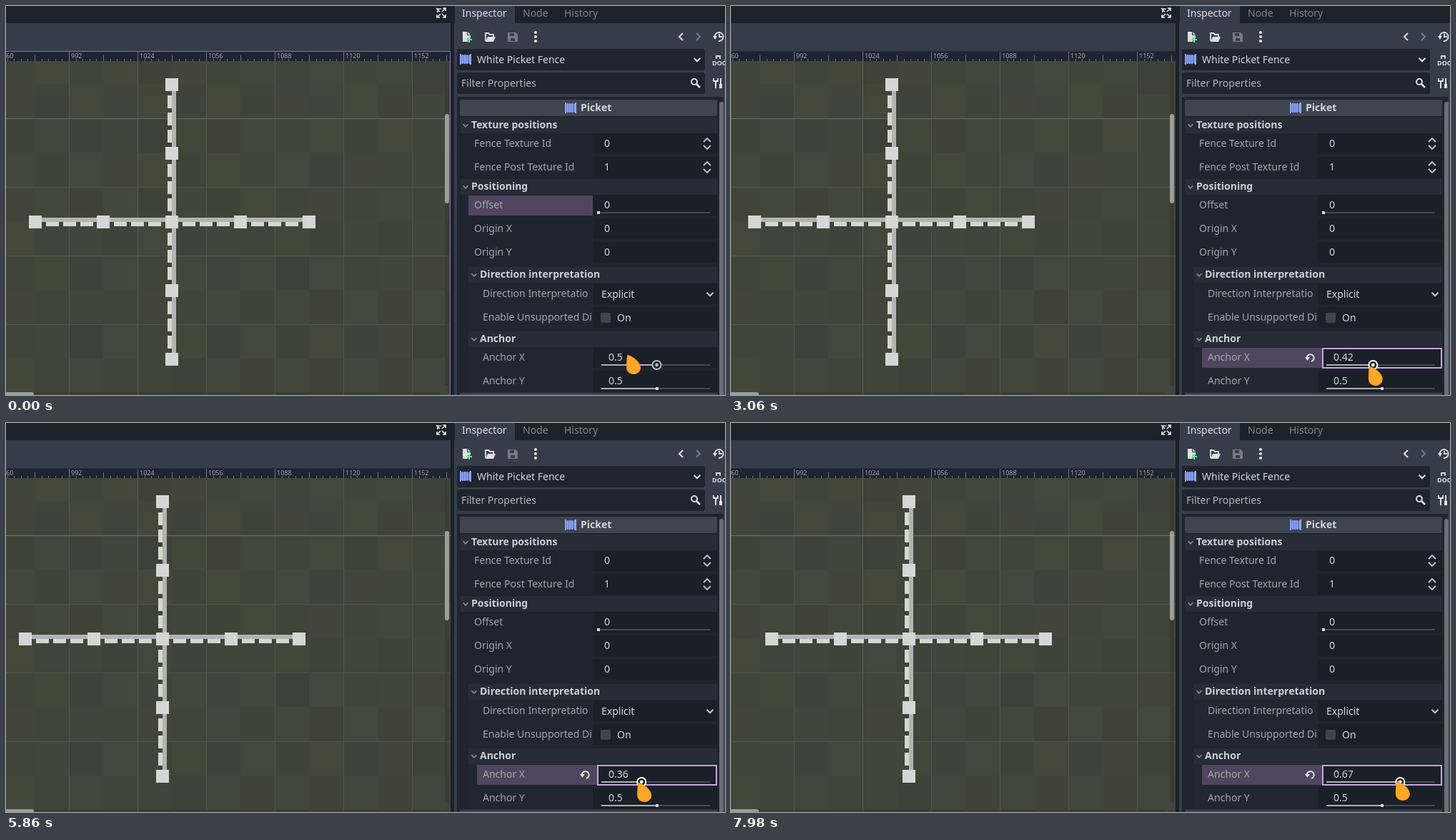
These frames come from a looping animation (1006x544 px, 8000 ms). An HTML page with a canvas:

```html
<!DOCTYPE html>
<html lang="en">
<head>
<meta charset="utf-8">
<title>Fence anchor slider</title>
<style>
html, body { margin: 0; width: 100%; height: 100%; overflow: hidden; background: #20242e; }
canvas { display: block; }
</style>
</head>
<body>
<canvas id="stage" width="1006" height="544"></canvas>
<script>
const ctx = document.getElementById('stage').getContext('2d');
const LOOP = 8000, SELECT = 1440, DRAG = 1660;
const DARK = '#1d212a', PANEL = '#363d4a', BOX = '#20242e', FIELD = '#1b1f28';
const LABEL = '#a3a6ad', BRIGHT = '#d3d5d9', ICON = '#e0e0e0', DIM = '#777b84', MARK = '#50455f';

// Keys: [time, value...]
const anchorKeys = [[1660, .5], [2220, .489], [2400, .487], [2500, .483], [3060, .42], [3240, .402],
  [3340, .39], [3940, .3], [4080, .285], [4340, .26], [4920, .26], [5400, .315], [5720, .354],
  [5860, .363], [6460, .5], [6700, .53], [7300, .618], [7980, .67]];
const cursorKeys = [[0, 868, 488], [400, 881, 501], [820, 899, 515], [1280, 904.5, 502], [1660, 904.5, 504]];
const cursorYKeys = [[1660, 504], [3060, 504], [3940, 503], [5860, 503], [6700, 501], [7980, 501]];

function sample(keys, t, col = 1) {
  const next = keys.findIndex(k => k[0] > t);
  if (next < 0) return keys[keys.length - 1][col];
  if (next === 0) return keys[0][col];
  const a = keys[next - 1], b = keys[next];
  return a[col] + (b[col] - a[col]) * (t - a[0]) / (b[0] - a[0]);
}

function rect(x, y, w, h, color) {
  ctx.fillStyle = color;
  ctx.fillRect(x, y, w, h);
}
function round(x, y, w, h, color, r = 3) {
  ctx.fillStyle = color;
  ctx.beginPath();
  ctx.roundRect(x, y, w, h, r);
  ctx.fill();
}
function dot(x, y, r, color) {
  ctx.fillStyle = color;
  ctx.beginPath();
  ctx.arc(x, y, r, 0, 7);
  ctx.fill();
}
function text(s, x, y, color = LABEL, font = '14px') {
  ctx.fillStyle = color;
  ctx.font = font + ' "Noto Sans", sans-serif';
  ctx.fillText(s, x, y);
}
function draw(path, color, width = 2) {
  ctx.strokeStyle = color;
  ctx.lineWidth = width;
  ctx.stroke(new Path2D(path));
}
function fill(path, color) {
  ctx.fillStyle = color;
  ctx.fill(new Path2D(path));
}

function viewport(focused) {
  rect(0, 0, 622, 24, DARK);
  rect(0, 24, 622, 39, PANEL);
  rect(0, 77, 622, 467, '#42453a');
  for (let i = 0; i < 14; i++) {
    for (let j = 0; j < 11; j++) {
      const noise = Math.abs(Math.sin(i * 12.9 + j * 78.2) * 43758.5) % 1;
      rect(i * 48 - 8, Math.max(77, 61 + j * 48), 48, 48,
        (i + j) % 2 ? `rgba(72,76,61,${noise * .45})` : `rgba(56,59,51,${noise * .35})`);
    }
  }
  for (let x = 88; x < 614; x += 96) rect(x, 77, 1, 467, x === 184 ? '#5b5e54' : '#525549');
  for (let y = 157; y < 540; y += 96) rect(0, y, 622, 1, y === 157 ? '#6c6e66' : '#525549');

  rect(0, 64, 622, 13, '#20242e');
  for (let i = -10; i < 56; i++) {
    const x = Math.round(88 + i * 9.6), h = i % 10 ? (i % 5 ? 3 : 8) : 13;
    rect(x, 77 - h, 1, h, '#747780');
  }
  for (let i = -1; i < 6; i++) text(992 + i * 32, 91 + i * 96, 73, '#a4a6ad', '9px');
  if (focused) {
    rect(0, 63, 622, 1, '#8d72a4');
    rect(621, 63, 1, 481, '#8d72a4');
  } else {
    rect(0, 63, 622, 1, '#252a34');
  }
  draw('M604 9V4h5M602 3l5 5M611 3h4v4M615 3l-5 5M603 12v4h4M603 16l5-5M615 12v4h-4M615 16l-5-5', ICON, 1.7);
}

function scrollbars() {
  round(614, 80, 6, 451, 'rgba(30,32,30,.2)');
  round(614, 151, 6, 125, '#9b9d98');
  round(0, 540, 607, 6, 'rgba(30,32,30,.2)');
  round(-4, 540, 43, 6, '#9b9d98');
}

function fence(center) {
  const posts = [-2, -1, 0, 1, 2];
  const xs = posts.map(k => Math.round(center + k * 95.8));
  const ys = posts.map(k => 302 + k * 96);
  const cx = xs[2];
  rect(xs[0], 296, xs[4] - xs[0], 6, '#b3b3b1');
  rect(cx, 110, 6, 384, '#b3b3b1');
  for (let i = 0; i < 4; i++) {
    for (let j = 0; j < 3; j++) {
      rect(xs[i] + 15 + j * 24, 302, 18, 6, '#d7d7d1');
      rect(cx - 6, ys[i] + 15 + j * 24, 6, 18, '#d7d7d1');
    }
  }
  xs.forEach(x => rect(x - 9, 293, 18, 18, '#d6d6d6'));
  ys.forEach(y => rect(cx - 9, y - 9, 18, 18, '#d6d6d6'));
}

function fenceIcon(x, y) {
  rect(x, y + 2, 16, 11, '#5f75bd');
  [0, 3, 6, 9, 13].forEach(dx => rect(x + dx, y + 1, 2, 13, '#8da5f3'));
  rect(x, y, 2, 15, '#8da5f3');
  rect(x + 14, y, 2, 15, '#8da5f3');
}
const chevron = (x, y, color = '#8b8e96', s = 3.5) =>
  draw(`M${x - s} ${y - s / 2}l${s} ${s}l${s} ${-s}`, color, s > 4 ? 2 : 1.6);

function toolbar() {
  rect(622, 0, 384, 544, DARK);
  rect(627, 24, 379, 520, PANEL);
  rect(628, 0, 84, 24, PANEL);
  text('Inspector', 638, 15, '#dddfe2');
  text('Node', 723, 15, '#7f838c');
  text('History', 781, 15, '#7f838c');

  fill('M639 36h6v5h5v4h-4v5h-7zM646 36l4 4h-4z', ICON);
  draw('M648 43v8M644 47h8', '#5fff97');
  draw('M671 49V38h4l2 2h5v3', ICON, 1.8);
  fill('M674 43h11l-3 7h-11z', ICON);
  fill('M702 37h11l3 3v10h-14z', DIM);
  rect(705, 38, 6, 4, PANEL);
  rect(706, 45, 6, 4, PANEL);
  [37, 43, 49].forEach(y => dot(741, y, 2.1, ICON));
  draw('M947 38l-5 5l5 5', ICON);
  draw('M966 38l5 5l-5 5', DIM);
  draw('M992 45A6 6 0 1 1 997 49M998 39v4h4', ICON, 1.8);
  fill('M989 42h6l-3 5z', ICON);

  round(631, 60, 347, 30, BOX);
  fenceIcon(635, 67);
  text('White Picket Fence', 659, 80, BRIGHT);
  chevron(967, 75, ICON, 4.5);
  round(631, 93, 347, 30, BOX);
  text('Filter Properties', 637, 113, '#b1b4ba');
  ctx.strokeStyle = ICON;
  ctx.lineWidth = 2;
  ctx.beginPath();
  ctx.arc(963, 106, 4, 0, 7);
  ctx.stroke();
  draw('M966 109l5 5', ICON, 2.5);
  draw('M994 74v-4h5v4', ICON, 1.8);
  text('DOC', 988, 83, ICON, 'bold 9px');
  draw('M993 104v11M1000 101v8', ICON);
  draw('M990 101v4h6v-4', ICON, 1.8);
  rect(998, 109, 4, 6, ICON);
}

function section(name, x, y) {
  rect(x - 16, y - 10, 995 - x + 16, 22, '#272c36');
  chevron(x - 8, y + 1);
  text(name, x, y + 5, '#cdd0d5', 'bold 14px');
}
function property(name, x, y, value, valueX) {
  rect(821, y - 14, 174, 29, FIELD);
  text(name, x, y + 5);
  text(value, valueX, y + 5, BRIGHT);
}
function slider(y, from, x, hot) {
  rect(from, y - 1, 985 - from, 2, '#484b53');
  rect(from, y - 1, x - from, 2, '#aeb0b5');
  if (!hot) return rect(x - 2, y - 2, 4, 4, '#d5d6d9');
  const color = hot === 2 ? '#ffffff' : '#b9bbc0';
  dot(x, y, 7, color);
  dot(x, y, 5, FIELD);
  dot(x, y, 2.4, color);
}

function inspector(t, anchor, knob, hoverY) {
  const selected = t >= SELECT, focused = t >= DRAG;
  rect(631, 127, 372, 417, BOX);
  round(998, 134, 6, 420, '#6b6f78');
  round(635, 131, 360, 23, '#40444f', 2);
  fenceIcon(782, 135);
  text('Picket', 804, 147, BRIGHT, 'bold 14px');

  section('Texture positions', 651, 166);
  property('Fence Texture Id', 655, 192, '0', 837);
  property('Fence Post Texture Id', 655, 225, '1', 837);
  [192, 225].forEach(y => draw(`M976 ${y - 2}l5 -5l5 5M976 ${y + 3}l5 5l5 -5`, '#c5c7cb', 1.8));

  section('Positioning', 651, 252);
  if (!selected) rect(647, 265, 174, 28, MARK);
  property('Offset', 655, 278, '0', 837);
  slider(289, 829, 829);
  property('Origin X', 655, 311, '0', 837);
  property('Origin Y', 655, 344, '0', 837);

  rect(647, 364, 174, 180, '#222630');
  section('Direction interpretation', 663, 375);
  property('Direction Interpretatio', 667, 402, '', 0);
  text('Explicit', 833, 408, BRIGHT);
  chevron(985, 403, '#c5c7cb', 4.5);
  property('Enable Unsupported Di', 667, 435, '', 0);
  round(832, 429, 14, 14, '#41444c', 2);
  text('On', 855, 441, BRIGHT);

  section('Anchor', 663, 465);
  if (selected) rect(659, 478, 168, 28, MARK);
  property('Anchor X', 667, 491, String(anchor), 843);
  if (selected) rect(821, 478, 7, 28, MARK);
  if (anchor !== .5) {
    draw('M806 494A5 5 0 1 1 812 497', ICON);
    fill('M803 491h7l-3.5 5z', ICON);
  }
  property('Anchor Y', 667, 524, '0.5', 843);
  if (focused) {
    rect(828, 479, 166, 27, FIELD);
    text(String(anchor), 843, 496, BRIGHT);
    ctx.strokeStyle = '#c9a2e3';
    ctx.lineWidth = 2;
    ctx.strokeRect(828, 479, 166, 27);
  }
  slider(502, 833, knob, selected ? 2 : hoverY ? 0 : 1);
  slider(535, 833, 911, hoverY ? 1 : 0);
  rect(635, 541, 360, 3, '#40444f');
}

function cursor(x, y) {
  ctx.save();
  ctx.translate(x, y);
  fill('M2.5 0C9 2 20 10 20 18A10 9.3 0 0 1 0 17.5C0 11 .5 6 1 1.5Q1.3 0 2.5 0Z', '#ffa726');
  draw('M2.5 .4C9 2.3 19.6 10 19.6 18A9.6 8.9 0 0 1 .4 17.5C.4 11 .9 6 1.3 1.6Z', 'rgba(214,133,24,.6)', .8);
  ctx.restore();
}

function frame() {
  const t = performance.now() % LOOP;
  const raw = sample(anchorKeys, t);
  const anchor = Math.round(raw * 100) / 100;
  const knob = 910.5 + (anchor - .5) * 152;
  const dragging = t >= DRAG;
  const x = dragging ? 904 + (raw - .5) * 152 : sample(cursorKeys, t);
  const y = dragging ? sample(cursorYKeys, t) : sample(cursorKeys, t, 2);
  viewport(!dragging);
  fence(232.2 + (anchor - .5) * 96);
  scrollbars();
  toolbar();
  inspector(t, anchor, knob, !dragging && y > 510);
  cursor(x, y);
  requestAnimationFrame(frame);
}
frame();
</script>
</body>
</html>
```
